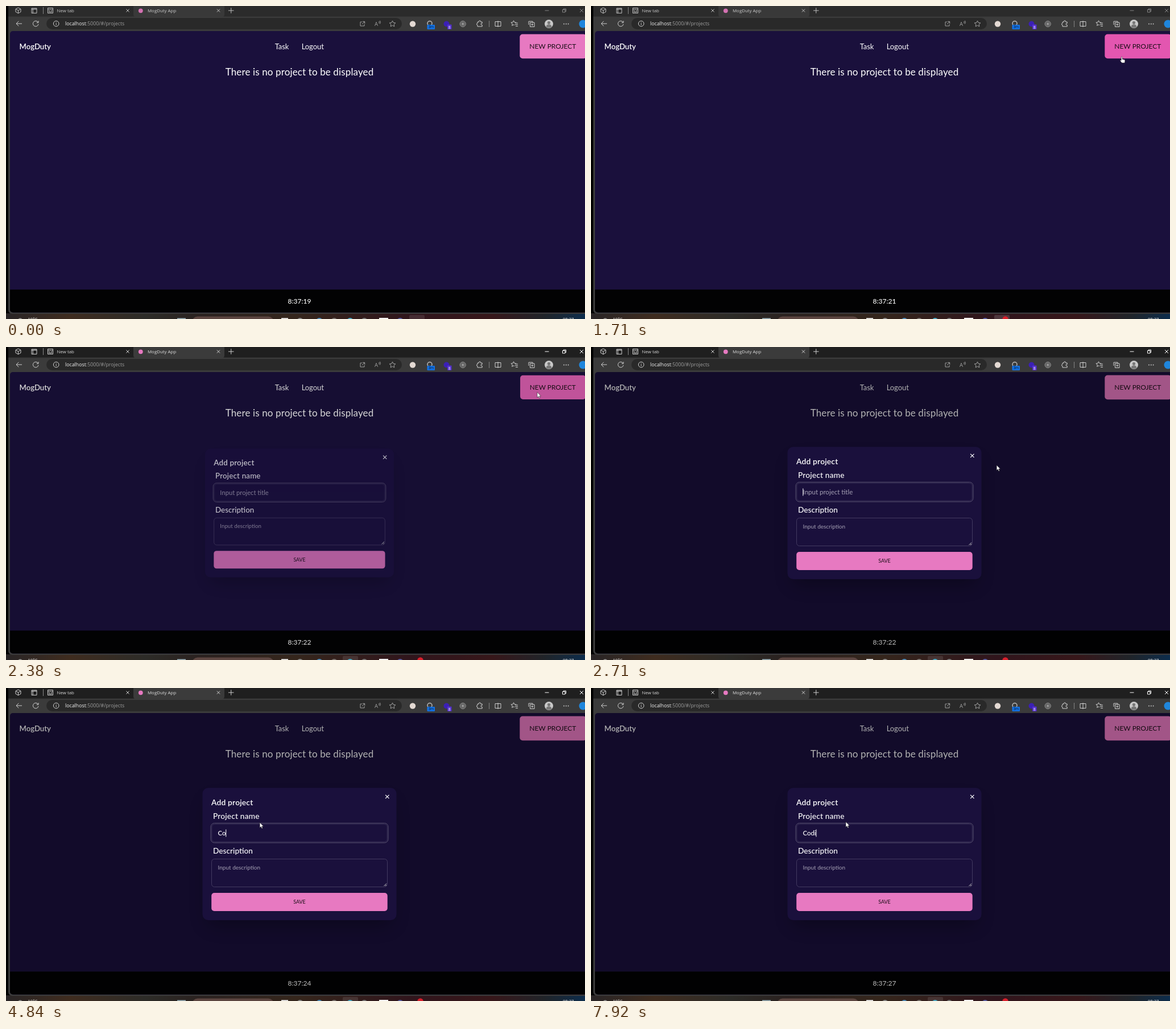
An HTML page that plays this animation: 1018 px wide and 550 px high, repeating every 8 s.

```html
<!DOCTYPE html>
<html lang="en">
<head>
<meta charset="utf-8">
<title>To-do app</title>
<style>
  html, body { margin: 0; width: 100%; height: 100%; overflow: hidden; background: #000; }
  svg { display: block; width: 1018px; height: 550px; }
  .app text { font-family: Lato, Inter, sans-serif; fill: #fff; }
  .ui text, .taskbar text { font-family: "Open Sans", "Noto Sans", sans-serif; }
  .mid { text-anchor: middle; }
  .line { fill: none; stroke: #cfcfcf; stroke-width: 1; stroke-linejoin: round; }
  .app .dark { fill: #1b0e17; }
  .app .hint { fill: #a5a0b4; }
</style>
</head>
<body>
<svg id="stage" viewBox="0 0 1018 550" xmlns="http://www.w3.org/2000/svg"></svg>
<script>
const LOOP = 8000;
const PINK = [231, 121, 193], HOVER = [227, 86, 176];
const OPEN = 2310, FOCUS = 2250;

const text = (x, y, size, str, attrs = '') =>
  `<text x="${x}" y="${y}" font-size="${size}" ${attrs}>${str}</text>`;
const rect = (x, y, w, h, fill, r = 0, attrs = '') =>
  `<rect x="${x}" y="${y}" width="${w}" height="${h}" rx="${r}" fill="${fill}" ${attrs}/>`;
const disc = (x, y, r, fill, attrs = '') =>
  `<circle cx="${x}" cy="${y}" r="${r}" fill="${fill}" ${attrs}/>`;
const line = (d, attrs = '') => `<path class="line" d="${d}" ${attrs}/>`;
const cross = (x, y, r) => `M${x - r} ${y - r}l${2 * r} ${2 * r}m0 ${-2 * r}l${-2 * r} ${2 * r}`;
const star = (x, y, r) => 'M' + Array.from({ length: 10 }, (_, i) => {
  const a = i * Math.PI / 5 - Math.PI / 2, d = i % 2 ? r * 0.48 : r;
  return `${(x + d * Math.cos(a)).toFixed(1)} ${(y + d * Math.sin(a)).toFixed(1)}`;
}).join('L') + 'Z';

const browser = `
  ${rect(4, -8, 1024, 549, '#3b3b3b', 7)}
  <rect id="titlebar" x="4" y="0" width="1014" height="18.5"/>
  <g id="tabs">
    ${rect(224, -6, 160, 26, '#3b3b3b', 5)}
    ${line('M21.5 3l4.5 2.3v5l-4.5 2.5-4.5-2.5v-5zM17 5.3l4.5 2.5L26 5.3M21.5 7.8v5')}
    ${line('M45 4h9v8.5h-9zM45 5.5h9M47.3 6v6.5', 'stroke-width="1.3"')}
    ${line('M65.5 2v12', 'stroke-opacity=".6"')}
    ${line('M73.5 3.5h9v9h-9zM73.5 6h9M75 8.5h2m2 0h2M75 10.5h6')}
    ${text(89.5, 11, 7.9, 'New tab', 'fill="#d8d8d8"')}
    ${line(cross(214, 8, 2.6))}
    ${disc(236.8, 8.3, 3.9, '#e779c1')}
    ${text(249, 11, 7.9, 'MogDuty App', 'fill="#dedede"')}
    ${line(cross(373.5, 8, 2.6))}
    ${line('M391 8h9.5m-4.75-4.75v9.5')}
  </g>
  <path id="controls" class="line" d="M947.5 8h7M978.5 6.5h4.5v4.5h-4.5zM980 6.3V5h4.5v4.7h-1.3${cross(1012, 8, 3)}"/>
  ${line('M18 31h10m-10 0l4.3-4.3M18 31l4.3 4.3', 'stroke-width="1.2"')}
  ${line('M56.5 28.8a4.8 4.8 0 1 0 .5 3M57 26v3.2h-3.2', 'stroke-width="1.2"')}
  ${rect(71, 21, 625, 20, '#292929', 10)}
  ${disc(88.2, 31, 4.8, 'none', 'stroke="#cfcfcf"')}
  ${line('M88.2 30.3v3.2M88.2 28.3v1')}
  ${text(104, 34.3, 8.8, 'localhost<tspan fill="#9d9d9d">:5000/#/projects</tspan>', 'fill="#f2f2f2"')}
  <g opacity=".72">
    ${line('M626 28h-3v7h7v-3M627 27.3h3.7V31m0-3.7l-4.7 4.7')}
    ${text(648, 34.5, 9.5, 'A', 'fill="#cfcfcf"')}
    ${line('M655.5 27q1.6 1.5 0 3.4m1.8-4.6q2.2 2.8 0 5.6')}
    ${line(star(679.5, 31.5, 5.6))}
  </g>
  ${disc(715, 31.5, 5.2, '#e3d9d3')}
  ${disc(745, 30.5, 4, 'none', 'stroke="#bbb" stroke-width="1.5"')}
  ${rect(740.5, 33, 13.5, 8, '#1473e6', 1)}
  ${text(747.3, 39.4, 6.5, '3m', 'class="mid" fill="#061b38"')}
  ${disc(774.5, 31.5, 5, '#3b20b5')}
  ${rect(776, 32.5, 7.5, 8.5, '#5430d0', 1)}
  ${text(779.8, 39.5, 7, '8', 'class="mid" fill="#fff"')}
  ${[5, 2.9].map(r => disc(803.2, 31.5, r, 'none', 'stroke="#c8c8c8" stroke-width=".8"')).join('')}
  ${disc(803.2, 31.5, 1.3, '#d8d8d8')}
  ${line('M829 28h2.4q-.4-2.3 1.6-2.3t1.6 2.3h2.6v2.4q-2.3-.2-2.3 1.4t2.3 1.5V36H829v-2.6q-1.5 0-1.5-1.5t1.5-1.5z')}
  ${line('M849.5 26v11', 'stroke-opacity=".5"')}
  ${line('M860 27.5h10v8h-10zM865 26v11')}
  ${line(star(892.5, 30.5, 4.8))}
  ${rect(894, 29.5, 7, 7, '#3b3b3b')}
  ${line('M895 30h5m-5 2.7h5m-4 2.7h4')}
  ${line('M919 33v-6h7v2M921.5 29h7.5v7.5h-7.5zM925.2 30.7v4m-2-2h4')}
  ${disc(954.5, 31.5, 7.5, '#c9c9c9')}
  ${disc(954.5, 29.3, 2.6, '#777')}
  <path d="M949.5 36.5a5 4.3 0 0 1 10 0a7.5 7.5 0 0 1-10 0" fill="#777"/>
  ${[981, 984.8, 988.6].map(x => disc(x, 31.5, .9, '#d0d0d0')).join('')}
  ${disc(1014.5, 31.5, 7, '#1f86dc')}`;

const modal = `
  <g id="modal">
    ${rect(354, 199, 324, 218, '#000', 12, 'opacity=".3" filter="url(#shade)"')}
    ${rect(345.5, 175.5, 341, 232.5, '#1a103c', 10)}
    ${line(cross(670.3, 191, 3.2), 'style="stroke:#fff;stroke-width:1.2"')}
    ${text(361, 205.6, 13.8, 'Add project', 'font-weight="600" letter-spacing=".2"')}
    ${text(364, 229.6, 13.7, 'Project name', 'font-weight="500" letter-spacing=".2"')}
    ${rect(360, 237.5, 312, 34.5, 'none', 6.5, 'stroke="#57506f"')}
    ${rect(361.8, 239.3, 308.4, 31, 'none', 5, 'stroke="#423960" stroke-width=".8"')}
    ${text(372.5, 259, 11.5, 'Input project title', 'id="titleHint" class="hint"')}
    ${text(372.5, 259, 11.4, '', 'id="typed" font-weight="500"')}
    <rect id="caret" y="248.5" width="1" height="13" fill="#fff"/>
    ${text(364, 290.9, 13.7, 'Description', 'font-weight="500"')}
    ${rect(361.5, 300.5, 309, 49, 'none', 5, 'stroke="#483f65" stroke-width=".9"')}
    ${text(372.5, 319, 10, 'Input description', 'class="hint"')}
    ${line('M664.5 348l4.5-4.5m-2 4.5l2-2')}
    ${rect(361.2, 360, 309.5, 32, '#e779c1', 5)}
    ${text(516, 379.2, 9, 'SAVE', 'class="mid dark"')}
  </g>`;

const app = `
  <g class="app" clip-path="url(#page)">
    ${rect(7, 44, 1012, 495, '#1a103c')}
    ${text(23.5, 76.4, 13.2, 'MogDuty', 'font-weight="600"')}
    ${text(472.7, 76, 12.9, 'Task')}
    ${text(519.7, 76, 12.9, 'Logout')}
    <g id="button">
      <rect id="buttonFill" x="903.3" y="49.5" width="117" height="42.7" rx="5"/>
      ${text(961.3, 75.2, 12, 'NEW PROJECT', 'class="mid dark"')}
    </g>
    ${text(516, 122.2, 17, 'There is no project to be displayed', 'class="mid" letter-spacing=".13"')}
    ${rect(7, 498.3, 1012, 41, '#020203')}
    ${text(516, 523, 12, '', 'id="clock" class="mid" font-weight="500"')}
    <rect id="dim" x="7" y="44" width="1012" height="495"/>
    ${modal}
  </g>`;

const taskbar = `
  <g class="taskbar">
    ${rect(0, 540, 1018, 10, 'url(#desk)')}
    ${disc(25, 553, 4.5, '#999')}
    ${text(38.5, 553.2, 7.6, '10°C', 'fill="#fff"')}
    ${rect(301, 548.5, 15, 6, '#9bb3bd')}
    ${rect(327, 545.5, 144, 20, '#5c4540', 10)}
    <rect id="activeApp" y="543" width="27" height="20" rx="2" fill="#fff"/>
    ${rect(484, 548.3, 12, 5, '#eee')}
    ${[[517, '#888'], [551, '#4d8fbf'], [577, '#77706c'], [605, '#48aeca'], [630, '#777'], [693, '#5960a8']]
      .map(([x, c]) => disc(x, 554, 6, c)).join('')}
    ${rect(656, 548, 16, 5, '#f5f5f5')}
    <circle id="record" cx="728.5" cy="550.5" r="5.2" fill="#d8202c"/>
    ${text(979, 553.2, 7.6, '08:37', 'fill="#fff"')}
  </g>`;

const deskStops = [[0, '#292526'], [11, '#3f2c1f'], [24, '#2d2c28'], [34, '#2a211f'], [50, '#35261c'],
  [70, '#30151c'], [84, '#37171a'], [93, '#202429'], [100, '#0d2d4c']];

document.getElementById('stage').innerHTML = `
  <defs>
    <clipPath id="page"><rect x="7" y="44" width="1030" height="494.5" rx="5"/></clipPath>
    <filter id="shade" x="-30%" y="-30%" width="160%" height="160%"><feGaussianBlur stdDeviation="16"/></filter>
    <linearGradient id="desk">${deskStops.map(([o, c]) => `<stop offset="${o}%" stop-color="${c}"/>`).join('')}</linearGradient>
  </defs>
  ${taskbar}
  <g class="ui">${browser}</g>
  ${app}
  <path id="arrow" d="M0 0v9.2l2.1-2 1.5 3.4 1.5-.7-1.5-3.2h2.9z" fill="#fff" stroke="#111" stroke-width=".5"/>
  <path id="hand" d="M-1 .8q1-1.3 2 0v3.8l3.5.8q1.4.4 1.2 2l-.6 3.7h-5l-3-3.8q-.5-1.3.9-1.2l1 .8z"
    fill="#fff" stroke="#111" stroke-width=".5"/>`;

const el = Object.fromEntries([...document.querySelectorAll('[id]')].map(e => [e.id, e]));
const set = (e, attrs) => { for (const k in attrs) e.setAttribute(k, attrs[k]); };
const progress = (t, start, length) => Math.min(1, Math.max(0, (t - start) / length));
const easeOut = (u, power) => 1 - (1 - u) ** power;
const latest = (list, t) => list.reduce((v, [at, next]) => t >= at ? next : v, list[0][1]);

// Pointer stops: time, x, y
const route = [[200, 728, 556], [1000, 933, 91.5], [1650, 933, 91.5], [1920, 934, 79.5], [2400, 934, 79.5],
  [2710, 714, 207.5], [2970, 505, 240], [3380, 441.5, 238], [3580, 441.5, 238], [3650, 442.5, 237.5],
  [3790, 443, 237], [3910, 444, 236.5], [4110, 444.5, 236.5], [4240, 446, 236.5], [5600, 446.5, 236.3],
  [5630, 448, 235.3], [8000, 448, 235.3]];
const ticks = [[0, 19], [70, 20], [1050, 21], [2190, 22], [3110, 23], [4110, 24], [5100, 25], [6120, 26], [7120, 27]];
const typing = [[0, ''], [4500, 'C'], [4840, 'Co'], [5980, 'Cod'], [6710, 'Codn'], [7590, 'Cod'], [7920, 'Codi']];
const caretStates = [[0, 0], [2440, 1], [2840, 0], [3380, 1], [3910, 0], [4440, 1], [5360, 0], [5910, 1],
  [6250, 0], [6600, 1], [7390, 0], [7920, 1]];

function pointerAt(t) {
  const i = route.findIndex(p => p[0] > t);
  if (i < 1) return route[i < 0 ? route.length - 1 : 0].slice(1);
  const [a, b] = [route[i - 1], route[i]];
  let u = progress(t, a[0], b[0] - a[0]);
  if (i === 1) u = easeOut(u, 1.6);
  return [1, 2].map(k => a[k] + (b[k] - a[k]) * u);
}

function draw(t) {
  const focused = t >= FOCUS;
  set(el.titlebar, { fill: focused ? '#1f1f1f' : '#2b2b2b' });
  set(el.tabs, { opacity: focused ? 1 : .9 });
  set(el.controls, { style: `stroke:${focused ? '#fff' : '#858585'}` });
  set(el.activeApp, { x: focused ? 592 : 709, opacity: focused || t < 300 ? .1 : .14 });
  set(el.record, { opacity: t < 300 ? 0 : 1 });

  const hover = progress(t, 980, 200) - progress(t, OPEN, 200);
  const color = PINK.map((c, i) => Math.round(c + (HOVER[i] - c) * hover));
  const press = t >= 2190 ? .98 + .02 * progress(t, OPEN, 200) : 1;
  set(el.buttonFill, { fill: `rgb(${color})` });
  set(el.button, { transform: `translate(961.5 71) scale(${press}) translate(-961.5 -71)` });

  const u = progress(t, OPEN, 200), shown = easeOut(u, 3);
  set(el.dim, { opacity: .3 * easeOut(u, 1.7) });
  set(el.modal, {
    opacity: shown,
    transform: `translate(516 291.5) scale(${.9 + .1 * shown}) translate(-516 -291.5)`
  });

  el.clock.textContent = '8:37:' + latest(ticks, t);
  el.typed.textContent = latest(typing, t);
  set(el.titleHint, { opacity: el.typed.textContent ? 0 : 1 });
  set(el.caret, { x: 372.3 + el.typed.getComputedTextLength(), opacity: latest(caretStates, t) });

  const [x, y] = pointerAt(t);
  const pointing = t < OPEN && x > 903 && y < 93;
  set(el.arrow, { transform: `translate(${x} ${y})`, opacity: pointing || t < 200 ? 0 : 1 });
  set(el.hand, { transform: `translate(${x} ${y})`, opacity: pointing ? 1 : 0 });
}

const start = performance.now();
function tick() {
  draw((performance.now() - start) % LOOP);
  requestAnimationFrame(tick);
}
tick();
</script>
</body>
</html>
```
